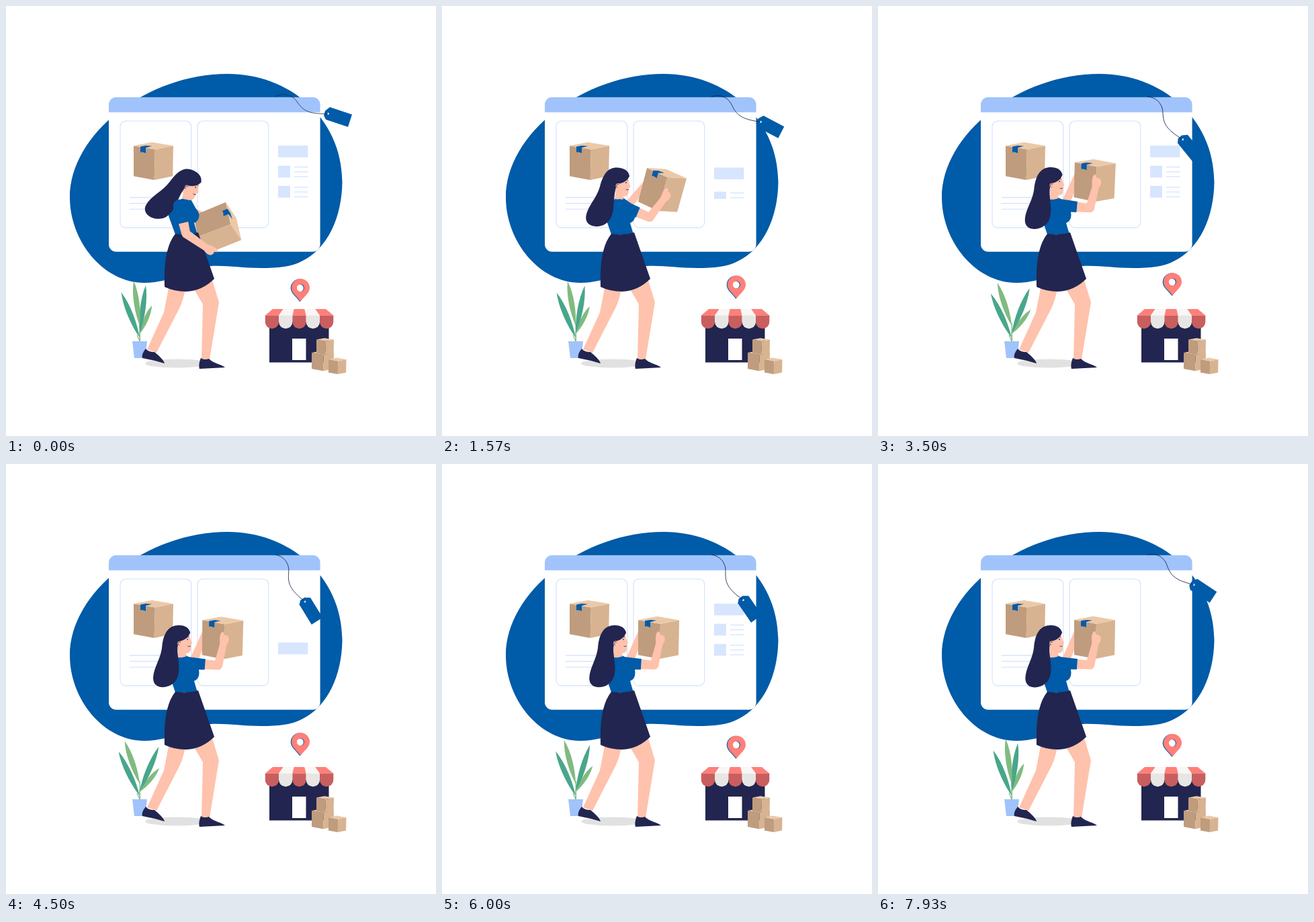
Recreate the animation shown at these times as an HTML page with a canvas. Size 640 px wide and 640 px high, loop 8000 ms.

```html
<!DOCTYPE html>
<html lang="en">
<head>
<meta charset="utf-8">
<title>Stocking the online shop</title>
<style>
html, body { margin: 0; width: 100%; height: 100%; overflow: hidden; background: #fff; }
canvas { display: block; width: 100vw; height: 100vh; }
</style>
</head>
<body>
<canvas id="stage"></canvas>
<script>
const canvas = document.getElementById('stage');
const ctx = canvas.getContext('2d');
const ratio = window.devicePixelRatio || 1;
canvas.width = canvas.height = 640 * ratio;

const LOOP = 8000;
const BLUE = '#005ba8', NAVY = '#22254f', SKIN = '#ffc2ac', SKY = '#a1c3fb', PALE = '#d7e5ff';
const CORAL = '#ff7f79', RED = '#c95e5e', GREEN = '#80bb80', TEAL = '#48a68b';
const RAD = Math.PI / 180;

// ---- helpers ----
// 0 to 1 and back, once per period
const wave = (t, period) => (1 - Math.cos(2 * Math.PI * t / period)) / 2;

// falls from 1 to 0, passing one half at the given time
const settle = (t, half, power) => 1 / (1 + (t / half) ** power);

function spin(x, y, deg) {
  const c = Math.cos(deg * RAD), s = Math.sin(deg * RAD);
  return [x * c - y * s, x * s + y * c];
}

function fill(color, path) {
  ctx.fillStyle = color;
  ctx.fill(typeof path === 'string' ? new Path2D(path) : path, 'evenodd');
}

function line(color, width, path) {
  ctx.strokeStyle = color;
  ctx.lineWidth = width;
  ctx.stroke(new Path2D(path));
}

function poly(color, ...p) {
  ctx.beginPath();
  for (let i = 0; i < p.length; i += 2) ctx.lineTo(p[i], p[i + 1]);
  ctx.closePath();
  ctx.fillStyle = color;
  ctx.fill();
}

function disc(color, x, y, r, ry = r) {
  ctx.beginPath();
  ctx.ellipse(x, y, r, ry, 0, 0, 7);
  ctx.fillStyle = color;
  ctx.fill();
}

function round(color, x, y, w, h, r = 0) {
  ctx.beginPath();
  ctx.roundRect(x, y, w, h, r);
  ctx.fillStyle = color;
  ctx.fill();
}

// tapered bar between two points
function limb(color, x1, y1, x2, y2, w1, w2) {
  const len = Math.hypot(x2 - x1, y2 - y1) || 1;
  const nx = (y1 - y2) / len / 2, ny = (x2 - x1) / len / 2;
  poly(color, x1 + nx * w1, y1 + ny * w1, x2 + nx * w2, y2 + ny * w2,
    x2 - nx * w2, y2 - ny * w2, x1 - nx * w1, y1 - ny * w1);
}

function placed(x, y, deg, draw) {
  ctx.save();
  ctx.translate(x, y);
  ctx.rotate(deg * RAD);
  draw();
  ctx.restore();
}

// ---- scenery ----
function carton(x, y, w, h, tape) {
  const m = w * .54, s = w * .095, foot = x + w * .52;
  poly('#bf9c7d', x, y, x + m, y + s, foot, y + h + s, x, y + h);
  poly('#d7b391', x + m, y + s, x + w, y, x + w * .985, y + h, foot, y + h + s);
  poly('#ebc9a8', x, y, x + w * .46, y - w * .09, x + w, y, x + m, y + s);
  if (!tape) return;
  poly(BLUE, x + 10, y + 1.2, x + 18, y - .2, x + 27, y + .6, x + 18, y + 3,
    x + 18, y + 11, x + 14, y + 9.6, x + 10, y + 9.4);
}

function page() {
  fill(BLUE, 'M330 101C420 101 500 165 500.5 262C500 315 478 362 440 380C425 388 405 390 380 390' +
    'C350 390 330 386 305 387C270 389 250 412 206 412C145 412 95 350 95 285C95 190 210 101 330 101Z');
  round('#fff', 153, 136, 314.6, 229.7, 11);
  round(SKY, 153, 135.7, 314.6, 22.6, [11, 11, 0, 0]);
  ctx.strokeStyle = PALE;
  ctx.lineWidth = 1.3;
  for (const x of [170, 285]) {
    ctx.beginPath();
    ctx.roundRect(x, 171.2, 105.7, 158.8, 8);
    ctx.stroke();
  }
  for (let i = 0; i < 3; i++) line(PALE, 1.4, `M184 ${285 + i * 8.7}H240`);
  carton(190, 208, 59, 45.3, true);
}

// panel items leave through the top and return from below, one after another
const PANEL_RUNS = [[460, 1390], [3500, 4430], [7000, LOOP]];

function panelShift(t, i) {
  for (const [leave, enter] of PANEL_RUNS) {
    const out = t - leave - i * 130, back = t - enter - i * 30;
    if (back >= 0 && back < 700) return 80 * (1 - back / 700) ** 3;
    if (out > 0 && back < 0) return -700 * (out / 1000) ** 2;
  }
  return 0;
}

function panel(t) {
  ctx.save();
  ctx.beginPath();
  ctx.rect(400, 207, 60, 80);
  ctx.clip();
  for (let i = 0; i < 3; i++) {
    const y = 207.8 + i * 30 + panelShift(t, i);
    round(PALE, 405, y, i ? 18 : 44.3, 17.5);
    for (let row = 0; i && row < 3; row++) line(PALE, 1.4, `M429 ${y + 1.8 + row * 7.2}H449.5`);
  }
  ctx.restore();
}

function tag(t) {
  placed(401, 135, 41 * wave(t, 10000), () => {
    poly(BLUE, 74, 21, 81, 15.5, 114, 26.5, 108, 45, 75, 34, 72, 28);
    disc(PALE, 78.5, 25.3, 1.5);
    line(NAVY, .8, 'M0 0C11-6 23-4 31 6C41 21 49 26 78 25.3');
  });
}

function leaf(color, y, rot, len, w) {
  placed(199, y, rot, () => fill(color,
    `M0 0C${-w * .8} ${-len * .3} ${-w} ${-len * .7} 0 ${-len}C${w} ${-len * .7} ${w * .8} ${-len * .3} 0 0Z`));
}

function plant(t) {
  const k = wave(t - 300, LOOP);
  line(GREEN, 1.3, 'M199.3 500V472');
  leaf(GREEN, 488, 23 + 16.6 * k, 46, 5);
  leaf(TEAL, 487, 7 + 16.3 * k, 72, 6);
  leaf(TEAL, 494, -22 - 3.5 * k, 73, 6);
  leaf(GREEN, 476, -7.5 - 12 * k, 67.5, 6);
  line(GREEN, 1.1, 'M199.3 500L195 490M199.3 500L199 484');
  poly(SKY, 188, 499, 210, 499, 207, 524, 191, 524);
}

function shop() {
  round(NAVY, 392, 470, 88.5, 60.6);
  round('#fff', 426, 495, 20.5, 32);
  const w = 20.3, top = 15.8;
  for (let i = 0; i < 5; i++) {
    const x = 385.8 + i * w, u = 397 + i * top;
    poly(i % 2 ? '#f8f7f6' : CORAL, u, 451, u + top, 451, x + w, 460.5, x, 460.5);
    round(i % 2 ? '#e8e6e4' : RED, x, 460.5, w, 19.7, [0, 0, 10, 10]);
  }
  carton(455, 516, 33, 24);
  carton(462, 496.5, 26, 20);
  carton(480, 526, 26.5, 19.5);
}

function pin(t) {
  const phase = t / 6500 % 1;
  const y = 419.5 - 19 * Math.min(phase, 1 - phase);
  const shape = new Path2D('M0 20.5C-5 13-13.6 8-13.6 0A13.6 13.6 0 0 1 13.6 0C13.6 8 5 13 0 20.5Z');
  shape.arc(0, 0, 5.5, 0, 7);
  placed(437.3, y + .3, 0, () => fill(BLUE, shape));
  placed(438.4, y, 0, () => fill(CORAL, shape));
}

// ---- woman ----
function lowerBody() {
  disc('#e1e1e1', 254, 532, 47, 6.5);
  fill(SKIN, 'M243 415L267 420Q264 438 258 450L224 516L210 511L235 456Z');
  fill(SKIN, 'M278 418L306 405L317 441L303 526H291L293 444Z');
  fill(NAVY, 'M208 510C203 516 202 521 203 524L222 528L236 532C235 527 227 520 221 515C216 515 211 514 208 510Z');
  fill(NAVY, 'M290 524C287 531 287 537 288 540L326 538C320 533 308 532 302 525C297 527 293 526 290 524Z');
}

// bend is 1 when she stoops and 0 when she stands upright
function torso(bend) {
  fill(BLUE, `M${256 + 6 * bend} 287L${268 + 6 * bend} ${285 + bend}L283 ${293 + 9 * bend}Q289 308 287 315` +
    `Q286 320 280 323L285 340H252L${246 - 6 * bend} ${322 - 15 * bend}L250 ${298 - 7 * bend}Z`);
  fill(NAVY, 'M252 339Q270 342 286 337L310 406Q292 424 268 425Q250 425 236 418Q235 384 240 365Q244 349 252 339Z');
}

// the crown turns with the head while the loose end swings on its own
function hair(tilt, swing) {
  const crown = (x, y) => spin(x, y, tilt).join(' ');
  const tail = (x, y) => spin(x, y, swing).join(' ');
  fill(NAVY, `M${crown(16, -16)}C${crown(14, -24)} ${crown(7, -27)} ${crown(-1, -27)}` +
    `C${crown(-16, -27)} ${tail(-24, -16)} ${tail(-26, 6)}C${tail(-28, 25)} ${tail(-39, 37)} ${tail(-38.5, 54)}` +
    `C${tail(-37, 71)} ${tail(-10, 68)} ${tail(-3, 52)}C${tail(3, 38)} ${tail(-3, 24)} ${crown(-3, 6)}` +
    `L${crown(-1, -3)}C${crown(7, -4)} ${crown(13, -9)} ${crown(15, -14)}Z`);
}

function head(x, y, tilt, swing, bend) {
  const [nx, ny] = spin(4, 4, tilt);
  limb(SKIN, x + nx, y + ny, 262 + 6 * bend, 288, 12, 12.5);
  placed(x, y, tilt, () => {
    fill(SKIN, 'M-6-9L9-16L14.5-15Q14.5-8 19-1Q19 1 16.8 1.5L17 5Q17.5 13 13 14.3Q8 15 4 12L-4 8Z');
    disc(NAVY, 11.8, -6, .9);
    line(NAVY, .8, 'M10-9.5Q12-11 14-9.5M12.5 4Q14.5 5.5 16.8 3.6');
  });
  placed(x, y, 0, () => hair(tilt, swing));
  placed(x, y, tilt, () => {
    disc(SKIN, .3, 0, 3.4);
    line(NAVY, .8, 'M1.8-1.6A2.3 2.3 0 1 0 0 2.4');
  });
}

// the elbow follows from the two arm lengths and the hand's place
function nearArm(bend, px, py) {
  const sx = 266 - 8 * bend, sy = 296 + bend;
  const upper = 50 - 7 * bend, fore = 40 + 4 * bend;
  const reach = Math.hypot(px - sx, py - sy);
  const cos = (upper ** 2 + reach ** 2 - fore ** 2) / (2 * upper * reach);
  const angle = Math.atan2(py - sy, px - sx) + Math.acos(Math.min(1, cos));
  const dx = upper * Math.cos(angle), dy = upper * Math.sin(angle);
  const ex = sx + dx, ey = sy + dy;
  const hx = sx + dx * .61, hy = sy + dy * .61;

  limb(SKIN, hx, hy, ex, ey, 14.5, 13);
  disc(SKIN, ex, ey, 6.5);
  limb(SKIN, ex, ey, px, py, 13, 9.5);
  placed(px, py, Math.atan2(py - ey, px - ex) / RAD + 79, () =>
    fill(SKIN, 'M-6 9Q-8 0-6.5-7Q-5-11-3-11Q-1-10-1-6Q4-7 6-3Q8 3 3 9Z'));
  disc(BLUE, sx, sy, 9);
  limb(BLUE, sx, sy, hx, hy, 19, 16);
}

function woman(t) {
  const bend = settle(t, 1050, 3.2), drift = settle(t, 1230, 3);
  const turn = 67.5 * bend;
  const bx = 292 + 35 * settle(t, 1380, 4), by = 232 + 60 * settle(t, 930, 3.3);
  const onBox = (x, y) => {
    const [dx, dy] = spin(x, y, turn);
    return [bx + dx, by + dy];
  };
  limb(SKIN, 280 - 4 * bend, 291 + 14 * bend, ...onBox(5, 18 + 22 * bend), 12, 10);
  placed(bx, by, turn, () => carton(0, 0, 61, 52, true));
  lowerBody();
  torso(bend);
  head(258 + 11 * drift, 267 + 3 * bend, 26 * bend, 31 * drift, bend);
  nearArm(bend, ...onBox(33 + 24.7 * bend, 28 + 20.8 * bend));
}

function frame(now) {
  const t = now % LOOP;
  ctx.setTransform(ratio, 0, 0, ratio, 0, 0);
  ctx.fillStyle = '#fff';
  ctx.fillRect(0, 0, 640, 640);
  page();
  panel(t);
  tag(t);
  plant(t);
  shop();
  pin(t);
  woman(t);
}

const begin = performance.now();
function tick() {
  frame(performance.now() - begin);
  requestAnimationFrame(tick);
}
tick();
</script>
</body>
</html>
```
